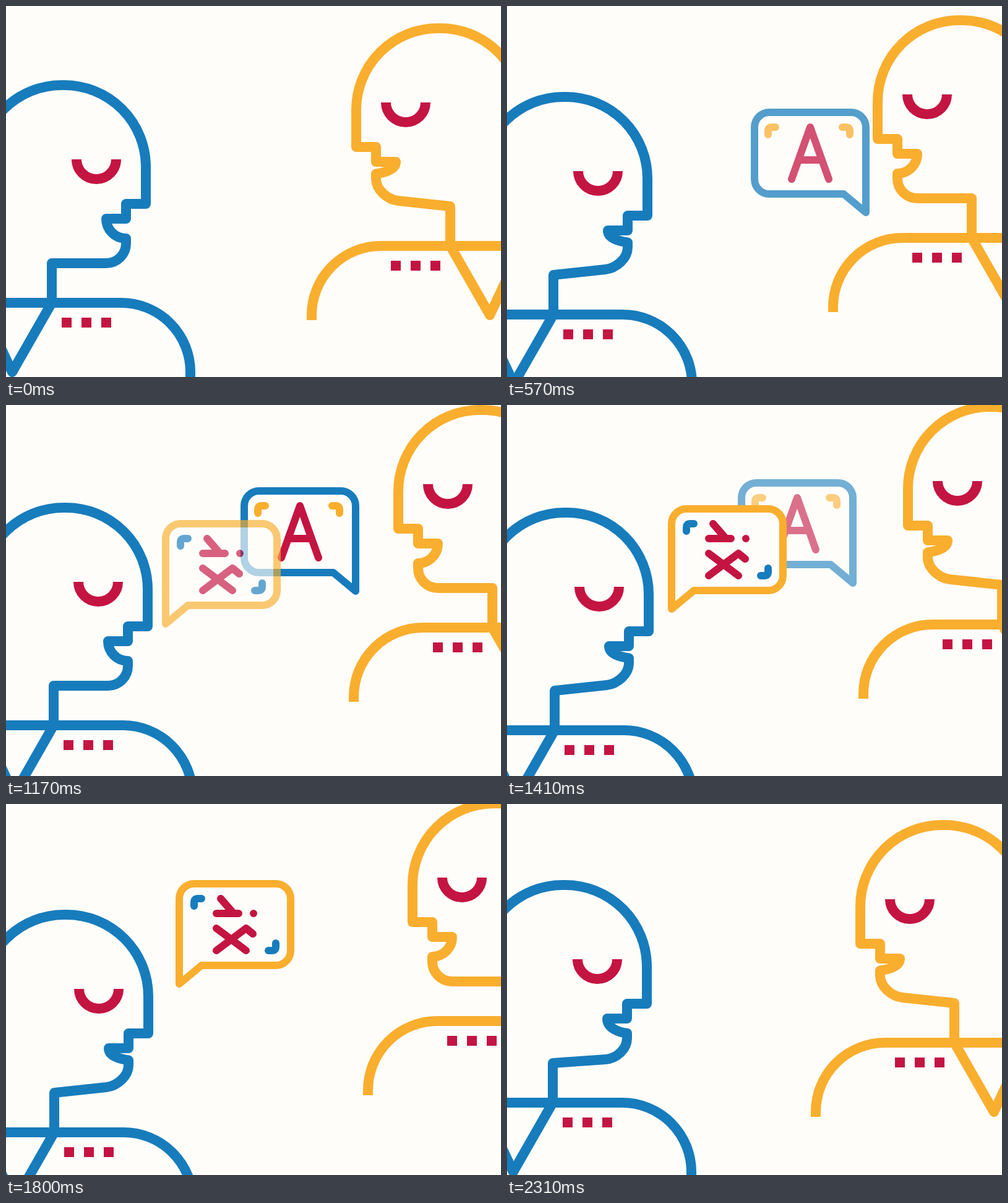
Write an HTML page that moves like this. It is 800x600 px and loops after 2340 ms.

```html
<!DOCTYPE html>
<html lang="en">
<head>
<meta charset="utf-8">
<title>Conversation</title>
<style>
  html, body { margin: 0; width: 100%; height: 100%; overflow: hidden; background: #fffdfa; }
  svg { display: block; width: 800px; height: 600px; fill: none; stroke-linejoin: round; }
  .blue { stroke: #177cbc; }
  .orange { stroke: #f9ae2e; }
  .red { stroke: #c41442; }
  .person { stroke-width: 16; }
  .bubble { stroke-width: 12; stroke-linecap: round; }
  .box { fill: #fffdfa; }
</style>
</head>
<body>
<svg viewBox="0 0 800 600">
  <defs>
    <!-- Facing left; the origin is the forehead line at the height of the crown -->
    <g id="body">
      <path d="M-72 472V464A112 112 0 0 1 40 352H400M152 352L216 464L268 352"/>
      <path class="red" d="M48 120a32 32 0 0 0 64 0M56 384h16m16 0h16m16 0h16"/>
    </g>
    <path id="box" d="M0 24A24 24 0 0 1 24 0H156A24 24 0 0 1 180 24V162L144 132H24A24 24 0 0 1 0 108Z"/>
  </defs>
  <g id="left" class="person blue"><use href="#body"/><path/></g>
  <g id="right" class="person orange"><use href="#body"/><path/></g>
  <g id="latin" class="bubble">
    <use href="#box" class="box blue"/>
    <path class="orange" d="M22 36v-6q0-6 6-6h6M142 24h6q6 0 6 6v6"/>
    <path class="red" d="M60 108L90 24L120 108M71 77H109"/>
  </g>
  <g id="glyph" class="bubble">
    <use href="#box" class="box orange" transform="translate(180) scale(-1 1)"/>
    <path class="blue" d="M24 36v-6q0-6 6-6h6M144 108h6q6 0 6-6v-6"/>
    <path class="red" d="M67 24L87 47M60 48H96M120 48h.01M60 72L108 108M60 108L108 72L119 81"/>
  </g>
</svg>
<script>
  const LOOP = 2340, STEP = 30, TURN = 1740;
  const byId = id => document.getElementById(id);
  const clamp = v => Math.max(0, Math.min(1, v));

  // Mouth poses per step: 0 open, 1 half, 2 closed
  const leftTalk = '0000112222211';
  const rightTalk = '2222221' + '0'.repeat(13) + '1222';
  const closure = [0, 2 / 3, 1];

  function headPath(c) {
    const lip = 248 - 12.5 * c, chinX = 64 + 4 * c, chinY = 288 - 9 * c;
    return `M268 352V132A132 132 0 0 0 136 0H132A132 132 0 0 0 0 132V192H32V216H64
      C64 ${233.7 - 5 * c} ${49.7 - 3 * c} ${248 - 15 * c} 32 ${lip}V${lip + 8}
      C32 ${lip + 25.7} ${chinX - 17.7} ${chinY - 2 * c} ${chinX} ${chinY}L152 288V352`;
  }

  function place(el, x, y, extra = '') {
    el.setAttribute('transform', `translate(${Math.round(x)} ${Math.round(y)}) ${extra}`);
  }

  function drawPerson(id, x, y, talk, step, extra) {
    const el = byId(id);
    place(el, x, y, extra);
    el.lastElementChild.setAttribute('d', headPath(closure[talk[step % talk.length]]));
  }

  // Drifts upward while fading in, holding, and fading out
  function drawBubble(id, age, x, y, vx, vy) {
    const el = byId(id);
    place(el, x + vx * age, y + vy * age);
    el.setAttribute('opacity', clamp(Math.min(age, 1440 - age) / 450));
  }

  function draw(now) {
    const step = Math.floor(now % LOOP / STEP), t = step * STEP;
    const p = t < TURN ? t / TURN : (LOOP - t) / (LOOP - TURN);
    drawPerson('left', 226 + 4 * p, 128 + 56.7 * p, leftTalk, step, 'scale(-1 1)');
    drawPerson('right', 566 + 100.8 * p, 36 - 41.1 * p, rightTalk, step);
    drawBubble('latin', t - 240, 408.25, 190.05, -0.025, -0.0547);
    drawBubble('glyph', t - 870, 248, 222, 0.0342, -0.1);
  }

  const start = performance.now();
  function tick() {
    draw(performance.now() - start);
    requestAnimationFrame(tick);
  }
  tick();
</script>
</body>
</html>
```
